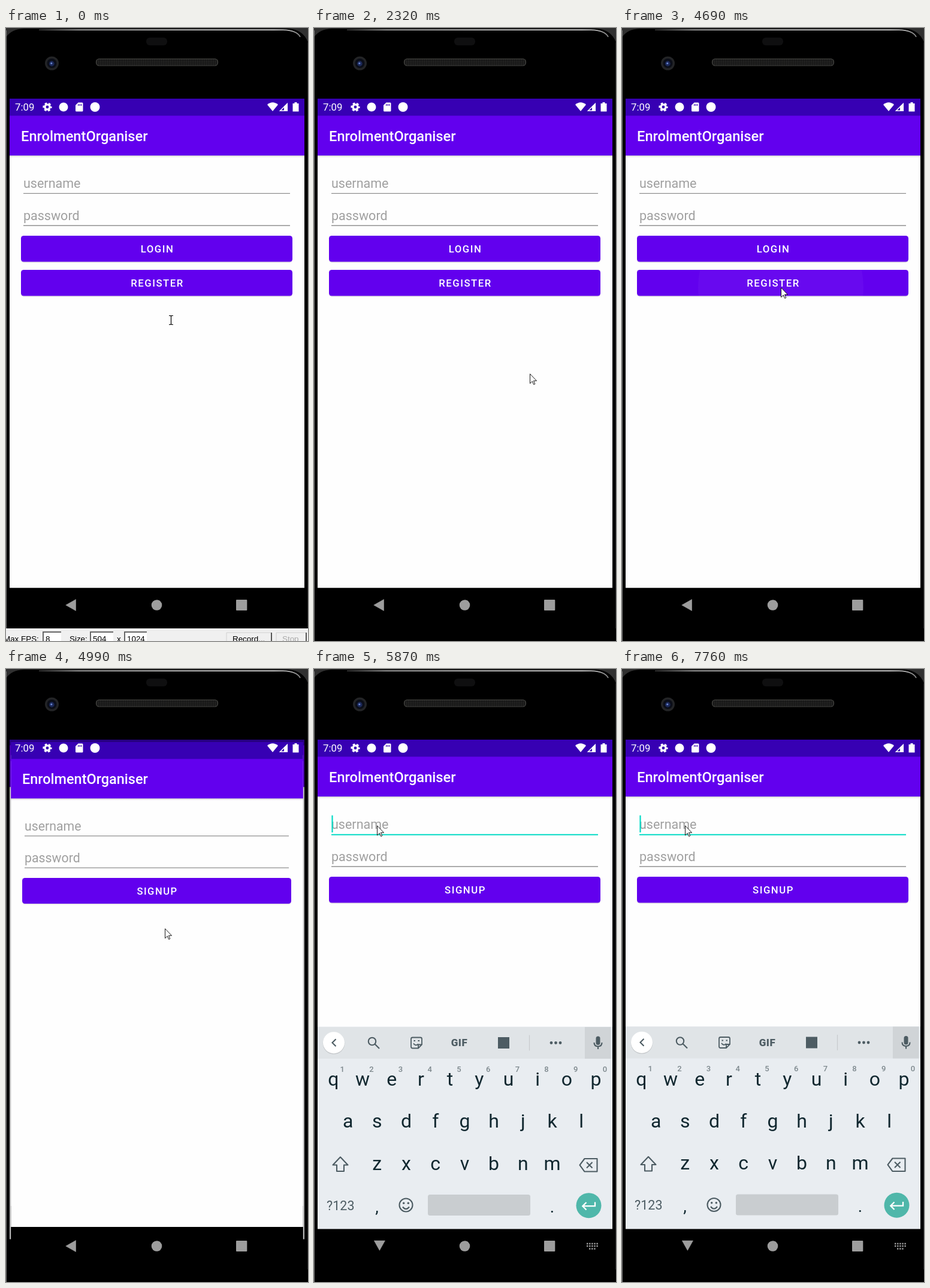
An HTML page for the animation above (8000 ms loop, 504x1024 px).

```html
<!DOCTYPE html>
<html lang="en">
<head>
<meta charset="utf-8">
<title>Sign-up flow</title>
<style>
html, body { margin: 0; width: 100%; height: 100%; overflow: hidden; background: #000; }
svg { display: block; width: 504px; height: 1024px; font-family: Roboto, sans-serif; }
.hint { font-size: 21.5px; fill: #a0a0a0; }
.label { font-size: 16.76px; font-weight: 500; letter-spacing: 1.5px; fill: #fff; text-anchor: middle; }
.key { font-size: 32px; fill: #10272f; text-anchor: middle; }
.digit { font-size: 13px; font-weight: 500; fill: #7d888d; text-anchor: middle; }
.win { font: 13.4px "Liberation Sans", Arial, sans-serif; }
.line { fill: none; stroke: #4d5c63; stroke-width: 2.1; }
</style>
</head>
<body>
<svg viewBox="0 0 504 1024">
  <defs>
    <clipPath id="display"><path d="M6 118H498V1003H6Z"/></clipPath>
    <clipPath id="panel"><path d="M6 118H498V935.3H6Z"/></clipPath>
    <clipPath id="registerClip"><rect x="25" y="404" width="453" height="43.5" rx="4.5"/></clipPath>
    <pattern id="mesh" width="3" height="3" patternUnits="userSpaceOnUse">
      <rect width="3" height="3" fill="#131313"/><circle cx="1.5" cy="1.5" r=".9" fill="#333331"/>
    </pattern>
    <linearGradient id="rim">
      <stop offset="0" stop-color="#333"/><stop offset=".15" stop-color="#aaa"/>
      <stop offset=".5" stop-color="#ccc"/><stop offset=".9" stop-color="#ddd"/><stop offset="1" stop-color="#888"/>
    </linearGradient>
    <linearGradient id="shade" x2="0" y2="1">
      <stop offset="0" stop-color="#000" stop-opacity=".16"/><stop offset="1" stop-color="#000" stop-opacity="0"/>
    </linearGradient>
  </defs>

  <rect width="504" height="1024"/>
  <g id="phone">
    <path d="M0 0H504V24Q496 2 470 1H30Q8 2 0 16Z" fill="#303030"/>
    <path d="M2 1024V22Q5 4 34 3H468Q494 4 500 22V1024Z"/>
    <path d="M55 3.2H462Q486 4 491 15" fill="none" stroke="url(#rim)" stroke-width="1.8"/>
    <path d="M.5 4V1024" stroke="#777"/>
    <path d="M503.5 24V1003" stroke="#222"/>
    <rect x="234" y="16" width="35" height="13" rx="6" fill="#0f0f10"/>
    <rect x="150.5" y="51.5" width="203" height="11.5" rx="5" fill="url(#mesh)" stroke="#3f3f3c" stroke-width="1.2"/>
    <circle cx="76.5" cy="59" r="11.5" fill="#232426"/>
    <circle cx="76.5" cy="59" r="8" fill="#0b0e18"/>
    <circle cx="76.3" cy="59.5" r="4.4" fill="#1b2858"/>
    <circle cx="75.8" cy="59" r="1.6" fill="#6d8ad6"/>
  </g>

  <g clip-path="url(#display)">
    <g id="login"></g>
    <g id="signup"></g>
  </g>
  <g clip-path="url(#panel)"><g id="keyboard"></g></g>

  <g id="status" fill="#fff">
    <text x="15" y="138.3" font-size="16.8">7:09</text>
    <circle cx="69" cy="132" r="4.1" fill="none" stroke="#fff" stroke-width="3.4"/>
    <circle cx="69" cy="132" r="6.5" fill="none" stroke="#fff" stroke-width="2.2" stroke-dasharray="3.8 3.007" stroke-dashoffset="1.9"/>
    <circle cx="96" cy="132" r="7.5"/>
    <path d="M120.5 124.5H127Q128.5 124.5 128.5 126V138Q128.5 139.5 127 139.5H117.5Q116 139.5 116 138V129Z"/>
    <path d="M120.7 127V130M123.2 127V130M125.7 127V130" stroke="#3700b3" stroke-width="1.2"/>
    <circle cx="148.5" cy="132" r="8"/>
    <path d="M436 128Q445 120.5 454 128L445 139Z"/>
    <path d="M457.5 138.3H469.3V126.5Z" fill="none" stroke="#fff" stroke-width="1.5"/>
    <path d="M464 131V138.5H469.5V126Z"/>
    <path d="M478.5 126H481.5V124H485.5V126H488.5V139.5H478.5Z"/>
  </g>

  <g id="nav" fill="#9d9d9d">
    <path id="back" d="M99.8 964L116.5 954.5V973.5Z" stroke="#9d9d9d" stroke-width=".6" stroke-linejoin="round"/>
    <path id="hide" d="M100.3 955H118.5L109.4 971.3Z" stroke="#9d9d9d" stroke-width=".6" stroke-linejoin="round"/>
    <circle cx="251.5" cy="964" r="8.8"/>
    <rect x="384" y="955" width="18.3" height="18" rx="1"/>
    <path id="switcher" d="M455 960H474M455 964H474M459 968.5H470" stroke="#9d9d9d" stroke-width="2.4" stroke-dasharray="2.4 1.7"/>
  </g>

  <g id="recorder" class="win">
    <path id="frame" fill="#f0f0f0"/>
    <path d="M0 1004H504" stroke="#fff" stroke-width="2"/>
    <g id="controls"></g>
  </g>

  <path id="beam" d="M272 480.5H274.5L275.5 481.5L276.5 480.5H279M275.5 481V495M272 495.5H274.5L275.5 494.5L276.5 495.5H279" fill="none" stroke="#000" stroke-width="1.2"/>
  <path id="arrow" d="M.5 .8V16.8L4.3 13.2L6.7 18.6L8.8 17.7L6.5 12.3H11.5Z" fill="#fff" stroke="#000" stroke-width=".9"/>
</svg>
<script>
const LOOP = 8000;
const GRAY = '#8f8f8f', TEAL = '#03dac5';
const $ = id => document.getElementById(id);
const text = (cls, x, y, s, more = '') => `<text class="${cls}" x="${x}" y="${y}" ${more}>${s}</text>`;
const show = (id, on) => $(id).setAttribute('visibility', on ? 'visible' : 'hidden');

function button(y, label, overlay = '') {
  return `<rect x="25" y="${y + 1.4}" width="453" height="43.5" rx="4.5" opacity=".1"/>
    <rect x="25" y="${y}" width="453" height="43.5" rx="4.5" fill="#6200ee"/>${overlay}` +
    text('label', 252.5, y + 28, label);
}

function field(y, hint, id) {
  return text('hint', 29, y - 9.3, hint) +
    `<path id="${id}" d="M29 ${y}H474" stroke="${GRAY}" stroke-width="1.3"/>`;
}

function activity(prefix, buttons) {
  return `<path d="M6 900H498V1010H6Z"/>
    <path d="M6 140H498V935.3H6Z" fill="#fefefe"/>
    <path d="M6 118H498V150H6Z" fill="#3700b3"/>
    <path d="M6 146.5H498V213H6Z" fill="#6200ee"/>
    <rect x="6" y="213" width="492" height="3.5" fill="url(#shade)"/>
    <text x="25" y="189" font-size="23.7" font-weight="500" fill="#fff">EnrolmentOrganiser</text>` +
    field(276.3, 'username', prefix + 'User') + field(330, 'password', prefix + 'Pass') + buttons;
}

function keyboard() {
  const row = (cls, keys, y, mid = 251.4) => [...keys].map((k, i) =>
    text(cls, mid + (i - (keys.length - 1) / 2) * 48.7, y, k)).join('');
  return `<path d="M6 597H498V980H6Z" fill="#e9edf1"/>
    <path d="M6 597.5H498V650.5H6Z" fill="#e0e4e7"/>
    <path d="M452 597.5H495V650.5H452Z" fill="#d0d4d7"/>
    <circle cx="33" cy="624.8" r="18.3" opacity=".12"/>
    <circle cx="33" cy="623.7" r="18" fill="#fff"/>
    <g class="line">
      <path d="M36.5 617.8L30.5 623.8L36.5 629.8"/>
      <circle cx="97" cy="621.5" r="6.2"/><path d="M101.5 626L109 633.5"/>
      <path d="M164.5 615H177.5Q180 615 180 617.5V627L174 633H164.5Q162 633 162 630.5V617.5Q162 615 164.5 615ZM174 633V627H180M166 625Q169.5 630 174 626M166.5 620.5H169M173.5 620.5H176" stroke-width="1.8"/>
      <path d="M359.5 611V637" stroke="#c7cbce" stroke-width="1.2"/>
      <path d="M467.5 623.5Q467.5 630 474 630T480.5 623.5M474 630V634.5"/>
      <path d="M44 814.8L56.5 828H50V838.5H38V828H31.5Z" stroke-linejoin="round"/>
      <path d="M451.5 817.5H472.5V839H451.5L443.5 828.2Z" stroke-linejoin="round"/>
      <path d="M455 823.5L464.5 833M464.5 823.5L455 833"/>
      <circle cx="153.5" cy="895" r="11"/><path d="M148 898Q153.5 905 159 898"/>
    </g>
    <g fill="#4d5c63">
      <rect x="307" y="614.5" width="19" height="19"/>
      <rect x="470.5" y="613" width="7" height="14.5" rx="3.5"/>
      ${[396, 403.5, 411].map(x => `<circle cx="${x}" cy="624" r="2.4"/>`).join('')}
      <circle cx="149.7" cy="891.8" r="1.7"/><circle cx="157.3" cy="891.8" r="1.7"/>
      <text x="242.5" y="629.7" font-size="17" font-weight="800" letter-spacing=".5" text-anchor="middle">GIF</text>
      <text x="44.3" y="903" font-size="21.5" text-anchor="middle">?123</text>
    </g>
    <rect x="190" y="877.5" width="171" height="35" rx="3.5" fill="#c9cdd0"/>
    <circle cx="458.5" cy="895.7" r="21" fill="#4fb7aa"/>
    <path d="M469 890V896.7H449M454.5 890.5L448.3 896.7L454.5 903" fill="none" stroke="#fff" stroke-width="2.3"/>` +
    row('digit', '1234567890', 672, 266.3) + row('key', 'qwertyuiop', 695.5) +
    row('key', 'asdfghjkl', 765.7) + row('key', 'zxcvbnm', 836) +
    text('key', 105, 907, ',', 'style="font-size:28px"') + text('key', 397.5, 907, '.', 'style="font-size:28px"');
}

function controls() {
  const box = (x, w, s) => `<path d="M${x} 1009H${x + w}V1030H${x}Z" fill="#fff"/>
    <path d="M${x} 1030V1009H${x + w}" fill="none" stroke="#666" stroke-width="2"/>` + text('', x + 4, 1025, s);
  const push = (x, w, s, color) => `<path d="M${x} 1010H${x + w}V1032H${x}Z" fill="#f0f0f0" stroke="#d0d0d0"/>
    <path d="M${x + w} 1010V1032H${x}" fill="none" stroke="#555" stroke-width="2"/>` +
    text('', x + 10, 1025, s, `fill="${color}"`);
  return text('', -4, 1025, 'Max FPS:') + box(62, 30, '8') + text('', 106, 1025, 'Size:') + box(141, 38, '504') +
    text('', 185, 1025, 'x') + box(198, 37, '1024') + push(368, 75, 'Record...', '#000') + push(451, 50, 'Stop', '#aaa');
}

$('login').innerHTML = activity('login', button(347, 'LOGIN') + button(404, 'REGISTER',
  '<circle id="ripple" cx="265" cy="433" fill="#fff" opacity=".035" clip-path="url(#registerClip)"/>'));
$('signup').innerHTML = activity('signup', button(347, 'SIGNUP') +
  `<path id="caret" d="M30.5 244.5V273" stroke="${TEAL}" stroke-width="2.2"/>`);
$('keyboard').innerHTML = keyboard();
$('controls').innerHTML = controls();

const STEP = 142.3, BASE = 1130;
const held = t => BASE + Math.floor((t - BASE) / STEP) * STEP;

const path = [
  [1270, 432, 985], [1560, 425, 900], [1980, 380, 640], [2265, 360, 577], [2430, 369, 562], [2700, 300, 470],
  [3000, 200, 340], [3270, 145, 284], [3410, 140, 280], [3700, 165, 305], [4120, 278, 415], [4400, 267, 434],
  [4500, 265, 433], [5120, 265, 433], [5400, 160, 315], [5540, 105, 261], [8000, 105, 261]
];

function along(t) {
  const i = Math.max(1, path.findIndex(p => p[0] > t));
  const [a, b] = [path[i - 1], path[i]];
  const k = Math.max(0, (t - a[0]) / (b[0] - a[0]));
  return [a[1] + (b[1] - a[1]) * k, a[2] + (b[2] - a[2]) * k];
}

function pointer(t) {
  if (t < 140) return null;
  if (t < 272) return [400, 285];
  if (t < 410) return [489, 82];
  return t < 1310 ? null : along(held(t));
}

// start, new scale, new opacity, old scale, old opacity
const poses = [
  [0, .85, 0, 1, 1], [4840, .9, .45, 1.015, .95], [4990, .991, 1, 1.046, .72],
  [5140, .998, 1, 1.05, .7], [5280, 1, 1, 1, 0]
];
const zoom = s => `translate(252 561) scale(${s}) translate(-252 -561)`;

function draw(t) {
  const [, inScale, inAlpha, outScale, outAlpha] = poses.findLast(p => t >= p[0]);
  $('login').setAttribute('transform', zoom(outScale));
  $('login').setAttribute('opacity', outAlpha);
  $('signup').setAttribute('transform', zoom(inScale));
  $('signup').setAttribute('opacity', inAlpha);
  $('ripple').setAttribute('r', t < 4690 ? 0 : t < 4840 ? 138 : 260);

  const focus = t >= 5720;
  $('signupUser').setAttribute('stroke', focus ? TEAL : GRAY);
  $('signupUser').setAttribute('stroke-width', focus ? 2 : 1.3);
  $('signupUser').setAttribute('transform', `translate(0 ${focus ? .5 : 0})`);
  show('caret', focus && (t < 6140 || (t >= 6740 && t < 7190) || t >= 7760));
  show('keyboard', focus);
  $('keyboard').setAttribute('opacity', t < 5870 ? .55 : 1);
  $('keyboard').setAttribute('transform', `translate(0 ${t < 5870 ? 28 : t < 5990 ? .5 : 0})`);
  show('back', !focus);
  show('hide', focus);
  show('switcher', focus);

  const closing = t >= 1160;
  show('recorder', t < 1310);
  $('recorder').setAttribute('opacity', closing ? .15 : 1);
  $('recorder').setAttribute('transform', closing ? 'translate(252 1003) scale(.96) translate(-252 -1022.8)' : '');
  $('frame').setAttribute('d', closing
    ? 'M-12 -30H-3V1003H508V-30H520V1060H-12Z' : 'M0 1003H504V1060H0Z');

  show('beam', t < 140);
  const at = pointer(t);
  show('arrow', at);
  if (at) $('arrow').setAttribute('transform', `translate(${at.map(Math.round)})`);
}

const start = performance.now();
function frame() {
  draw((performance.now() - start) % LOOP);
  requestAnimationFrame(frame);
}
draw(0);
requestAnimationFrame(frame);
</script>
</body>
</html>
```
